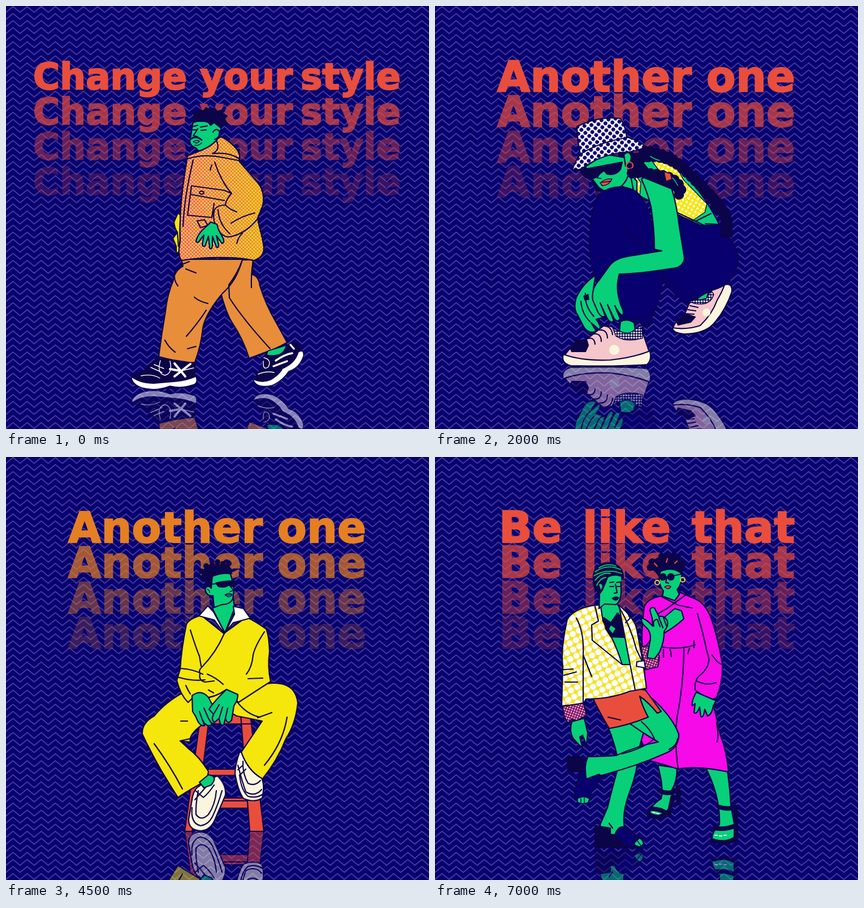
An HTML page that plays this animation: 748 by 748 pixels, repeating every 8000 ms.

```html
<!DOCTYPE html>
<html lang="en">
<head>
<meta charset="utf-8">
<title>Style slides</title>
<style>
html, body { margin: 0; width: 100%; height: 100%; overflow: hidden; background: #08006f; }
svg { display: block; width: 100vw; height: 100vh; }
.slide { opacity: 0; animation: 8s step-end infinite; }
#s1 { animation-name: first; }
#s2 { animation-name: second; }
#s3 { animation-name: third; }
#s4 { animation-name: fourth; }
@keyframes first { 0% { opacity: 1 } 6.25%, 100% { opacity: 0 } }
@keyframes second { 0% { opacity: 0 } 6.25% { opacity: 1 } 37.5%, 100% { opacity: 0 } }
@keyframes third { 0% { opacity: 0 } 37.5% { opacity: 1 } 68.75%, 100% { opacity: 0 } }
@keyframes fourth { 0% { opacity: 0 } 68.75%, 100% { opacity: 1 } }

text { font: 700 75px "DejaVu Sans", sans-serif; letter-spacing: .6px; fill: #e94e3d; stroke: #e94e3d; stroke-width: 2.4; }
.small { font-size: 64px; letter-spacing: .3px; }
.large { font-size: 77px; }
.amber { fill: #e67f22; stroke: #e67f22; }
.fig { fill: none; stroke: #0c0448; stroke-width: 2.2; stroke-linecap: round; stroke-linejoin: round; }
.skin { fill: #07d079; }
.ink { fill: #0c0448; }
.navy { fill: #08006f; }
.white { fill: #fff; }
.cream { fill: #fbf5de; }
.pink { fill: #f5c6ca; }
.red { fill: #e94e3d; }
.orange { fill: #e88e3a; }
.yellow { fill: #f5e60c; }
.magenta { fill: #f60ae8; }
.bare { stroke: none; }
.fine { stroke-width: 1.4; }
.light { stroke: #fff; }
.beads { stroke-dasharray: 0 11; }
.mirror { opacity: .5; }
</style>
</head>
<body>
<svg viewBox="0 0 748 748" preserveAspectRatio="none">
<defs>
  <pattern id="zig" width="24.93" height="12.47" patternUnits="userSpaceOnUse">
    <path d="M-2 13L12.47 .9L27 13" fill="none" stroke="#554dae" stroke-width="1.4"/>
  </pattern>
  <pattern id="halftone" width="4.4" height="4.4" patternUnits="userSpaceOnUse" patternTransform="rotate(45)">
    <circle cx="2.2" cy="2.2" r="1.65" fill="#f5e414"/>
  </pattern>
  <pattern id="hatDots" width="8.8" height="8.8" patternUnits="userSpaceOnUse" patternTransform="rotate(38)">
    <path d="M0 0h9v9h-9z" fill="#fff"/><circle cx="4.4" cy="4.4" r="3.4" fill="#08006f"/>
  </pattern>
  <pattern id="topDots" width="7.4" height="7.4" patternUnits="userSpaceOnUse" patternTransform="rotate(30)">
    <path d="M0 0h8v8h-8z" fill="#f5e60c"/><circle cx="3.7" cy="3.7" r="2.2" fill="#fff"/>
  </pattern>
  <pattern id="sockDots" width="4.6" height="4.6" patternUnits="userSpaceOnUse">
    <path d="M0 0h5v5h-5z" fill="#0c0448"/><circle cx="2.3" cy="2.3" r="1.7" fill="#fff"/>
  </pattern>
  <pattern id="coatDots" width="12.4" height="12.4" patternUnits="userSpaceOnUse" patternTransform="rotate(-28)">
    <path d="M0 0h13v13h-13z" fill="#f3e224"/><circle cx="6.2" cy="6.2" r="5.5" fill="#fff"/>
  </pattern>
  <pattern id="cuffDots" width="4.4" height="4.4" patternUnits="userSpaceOnUse" patternTransform="rotate(20)">
    <path d="M0 0h5v5h-5z" fill="#8c1668"/><circle cx="2.2" cy="2.2" r="1.2" fill="#fff"/>
  </pattern>
  <linearGradient id="warm"><stop offset=".1" stop-color="#f2508c"/><stop offset=".95" stop-color="#e88a3c"/></linearGradient>
  <path id="shell" d="M321 265C335 258 355 255 372 238Q377 229 385 233C398 242 415 255 413 268L412 274C424 288 434 300 445 312C456 325 458 345 452 358L445 375C448 395 455 410 456 428Q456 445 438 450C410 443 350 443 310 450Q303 440 308 415C306 360 312 320 321 265Z"/>
</defs>

<path fill="#08006f" d="M0 0h748v748H0z"/>
<path fill="url(#zig)" d="M0 0h748v748H0z"/>

<!-- Walking man -->
<g class="slide" id="s1">
  <text id="t1" class="small" y="147"><tspan x="48">Change</tspan> <tspan x="343">your</tspan> <tspan x="521">style</tspan></text>
  <use href="#t1" y="62" opacity=".7"/><use href="#t1" y="124" opacity=".42"/><use href="#t1" y="186" opacity=".22"/>
  <g class="fig" id="walker">
    <path class="orange" d="M418 449H437L436 475Q447 478 449 495Q460 530 478 560L497 595Q480 605 465 610L430 623Q420 590 400 560Q390 545 380 508Z"/>
    <path class="orange" d="M310 448L313 460Q298 468 296 485Q285 510 282 540Q275 580 270 620Q285 624 304 628Q322 632 334 630Q345 600 348 570Q352 545 383 508Q408 486 418 448Z"/>
    <path d="M417 452Q408 475 394 493L395 516Q420 555 467 606M437 450Q433 475 434 498M318 465l18 7M333 515Q343 523 357 526M354 538Q340 560 319 584M281 591Q288 604 299 612M321 606L336 602M298 470Q296 485 304 495M308 458L324 452"/>
    <path class="yellow" d="M304 366L297 382Q298 393 303 400L295 411L301 425V438L307 434L309 370ZM303 400L305 425"/>
    <path class="skin" d="M331 204Q329 216 327 228L325 240Q326 248 336 251Q340 258 350 257L372 240L381 215L365 204Z"/>
    <path class="ink" d="M331 206L330 197L335 195L330 188L339 188L341 182L349 186L354 180L361 184L369 181L373 186L384 184L383 191L391 194L386 200L391 207L383 209L379 215L368 206L362 211L358 206Q345 201 331 206Z"/>
    <path class="skin" d="M366 223Q371 215 377 221Q379 232 369 236"/>
    <path d="M331 213l8-2M344 214l12-2M330 219h7M345 220l9-1M339 217Q334 226 331 229l7 2"/>
    <path class="fine" d="M331 240q5-4 11-1q-4 6-11 1zM334 246q6 2 12-4"/>
    <path stroke-width="3" d="M327 235Q336 228 346 237"/>
    <use href="#shell" fill="url(#warm)"/>
    <use href="#shell" fill="url(#halftone)"/>
    <path d="M372 238Q380 254 365 261Q395 258 412 270M322 270Q350 261 384 268L410 273M331 272C320 320 315 350 313 390M369 276C376 298 388 320 399 331Q388 344 388 352Q372 352 368 362Q364 385 380 402Q388 410 397 408Q425 402 446 375M375 360Q376 385 396 403M440 366Q418 371 398 384M388 352Q396 360 408 364M418 402Q411 408 408 420M364 281l-3 9M328 318L386 326L398 331M328 318L326 333L386 344M326 333L321 370L364 374L368 349M338 380L351 378L357 388L344 392Z"/>
    <ellipse cx="346" cy="330" rx="4" ry="2.6"/>
    <path class="skin" d="M362 382C356 390 340 398 336 416Q339 421 343 414L350 405L347 423Q351 428 353 422L358 407L360 428Q364 432 365 424V407L372 426Q376 429 376 422L372 406L382 420Q387 419 384 411L376 396L373 386Z"/>
    <path class="ink" d="M268 623Q255 632 245 645L224 655Q219 662 226 668Q250 678 290 676Q320 676 336 668Q338 660 334 650V632Q300 626 268 623Z"/>
    <path class="white fine" d="M222 656Q240 669 265 667L300 664Q320 662 336 655Q340 668 330 670Q310 677 290 672Q265 682 240 675Q222 668 222 656Z"/>
    <path class="light" stroke-width="4" d="M298 632L317 655M326 633L298 655M290 642L307 645"/>
    <path class="light fine" d="M273 627Q266 650 281 653Q295 650 290 628M256 639L276 648M262 634L279 641M310 645L332 640M239 654Q258 650 272 658"/>
    <path class="ink" d="M460 612Q455 625 452 640L440 658Q437 668 448 670H470Q490 660 500 645Q520 635 526 615Q520 598 510 594L497 600Q480 607 460 612Z"/>
    <path class="skin fine" d="M463 610L496 600Q492 612 484 616Q470 620 461 617Z"/>
    <path class="white fine" d="M437 660Q455 668 470 660Q485 650 489 641Q511 632 517 612Q527 606 526 619Q519 640 500 646Q488 664 470 671Q442 677 437 660Z"/>
    <path class="light" stroke-width="3.4" d="M477 627Q493 616 506 614M473 637L497 628M503 599L509 606"/>
    <path class="light fine" d="M456 622Q470 625 464 638Q454 646 455 628M446 651Q460 645 474 648"/>
  </g>
  <use class="mirror" href="#walker" transform="matrix(1 0 0 -1 0 1358)"/>
</g>

<!-- Crouching woman -->
<g class="slide" id="s2">
  <text id="t2" y="151"><tspan x="110">Another</tspan> <tspan x="480">one</tspan></text>
  <use href="#t2" y="62.3" opacity=".7"/><use href="#t2" y="124.6" opacity=".42"/><use href="#t2" y="187" opacity=".22"/>
  <g class="fig" id="croucher">
    <path class="pink" d="M450 525L440 548Q420 560 421 573L450 578Q480 572 500 545L522 510Q524 495 512 492L488 503Q480 522 462 520Z"/>
    <path class="cream" d="M420 569Q445 573 469 565Q490 545 499 520Q508 505 512 493Q526 489 525 505Q515 535 496 558Q480 580 440 580Q420 578 420 569Z"/>
    <path class="ink" d="M427 557L445 545L460 550L452 559L430 564Z"/>
    <path class="skin" d="M466 502L486 498L480 518Q470 523 462 518Z"/>
    <path class="fine" fill="url(#sockDots)" d="M448 521Q466 521 480 517L488 503L493 510Q488 527 470 527Q458 528 448 521Z"/>
    <path d="M451 530l14 3M447 537l14 2M443 544l15 1"/>
    <circle class="cream bare" cx="480" cy="542" r="7"/>
    <path class="navy" d="M395 365L430 366L500 386Q540 425 536 455Q525 492 498 500Q480 505 463 518L445 524Q415 506 398 478Z"/>
    <path class="skin" d="M340 290L370 262L420 278Q470 320 503 387L470 388L430 370L360 335Z"/>
    <path fill="url(#topDots)" class="fine" d="M374 260L422 276L440 308L481 350L477 365Q466 372 455 380Q440 374 427 367L420 325ZM355 300L364 312L362 337L352 323Z"/>
    <path d="M462 380L488 367M478 385L500 386M430 366Q460 380 476 388"/>
    <g class="ink">
      <path fill="none" stroke-width="14" d="M355 270Q405 255 442 290T500 350T515 400"/>
      <path fill="none" stroke-width="21" class="beads" d="M355 270Q405 255 442 290T500 350T515 400"/>
      <path fill="none" stroke-width="10" d="M370 254Q420 258 455 300T505 365"/>
      <path fill="none" stroke-width="16" class="beads" d="M370 254Q420 258 455 300T505 365"/>
      <path d="M508 380L525 382V409L514 405L506 409Z"/>
      <path d="M324 260L345 255L362 270L380 292L350 302L334 300ZM274 300L285 327L296 328L284 300Z"/>
    </g>
    <path class="skin" d="M266 284Q274 302 289 320Q300 331 318 326L330 318L357 331V310L342 292L335 268L300 262Z"/>
    <path d="M330 318Q340 309 342 296M346 300L351 327"/>
    <path class="ink" d="M257 290L331 276L328 289Q318 301 304 297L299 291L292 296Q285 308 268 304Q260 300 257 290Z"/>
    <path class="red fine" d="M292 313Q302 304 313 306Q308 317 296 318Z"/>
    <path class="fine" d="M290 297l-3 7l7 1M294 312L310 310"/>
    <path class="skin" d="M334 263Q343 254 347 266Q347 279 337 283Z"/>
    <circle cx="344" cy="282" r="6" stroke="#e94e3d"/>
    <path class="navy" d="M288 334Q320 310 354 327Q376 343 384 390L400 440Q408 480 394 525L380 560L325 558Q320 520 285 487Q270 445 274 400Q276 360 288 334Z"/>
    <path d="M330 382Q345 410 372 424M404 478Q430 500 461 516M330 550Q355 557 382 545"/>
    <path class="skin" d="M284 476Q262 490 250 515Q244 535 252 546L264 569Q274 581 285 575L276 560L290 572Q296 569 285 554L300 550L280 500Z"/>
    <path d="M258 522Q260 545 274 558M266 508Q264 530 281 549"/>
    <path class="ink fine" d="M263 513l8-3l1 9l-7 1z"/>
    <path class="skin" d="M365 306Q385 292 412 304Q426 340 432 390L441 445Q440 462 420 464C390 468 360 474 326 474Q318 500 329 530Q336 544 331 547Q326 545 318 530L327 552Q324 561 317 553L305 528L316 556Q312 563 305 553L292 525L301 548Q295 553 288 541L279 520Q276 500 290 485L308 460Q318 446 345 442L401 433L388 430Q388 395 382 355Q376 330 365 306Z"/>
    <path class="ink" fill="none" stroke-width="13" d="M348 296Q385 293 410 301L432 330"/>
    <path stroke-width="18" class="beads" d="M348 296Q385 293 410 301T436 330L428 336"/>
    <path class="bare red" d="M406 294l10 3l2 9l-9 3z"/>
    <path stroke="#07d079" stroke-width="1.6" d="M420 304q6 6 9 13M381 266q10 6 16 7M440 305l7 9"/>
    <path fill="url(#hatDots)" d="M251 213Q290 194 328 199Q337 213 339 232Q362 238 373 249Q352 259 330 259Q290 265 262 286Q252 292 243 289Q250 270 257 262Q252 240 251 213Z"/>
    <path d="M257 262Q292 240 339 233"/>
    <path class="pink" d="M300 564L270 588Q240 598 228 620Q230 634 300 634L370 632Q382 625 380 615L366 574L352 584Q330 586 315 568Z"/>
    <path class="cream" d="M227 616Q260 628 310 626Q350 622 380 610Q384 626 375 634Q330 638 240 636Q222 631 227 616Z"/>
    <path class="ink" d="M239 604L250 592L268 590L271 600L266 611H242Z"/>
    <path class="skin" d="M328 558Q340 552 352 560L355 579Q340 582 326 575Z"/>
    <path class="fine" fill="url(#sockDots)" d="M314 569Q340 585 352 573L366 564L367 587Q340 596 320 584Z"/>
    <path d="M270 588q12-3 13 10M280 580q14-2 14 13M290 573q14-2 15 14M299 566q13 0 15 15M364 570l14-7l-3 7"/>
    <circle class="cream bare" cx="317" cy="608" r="9"/>
  </g>
  <use class="mirror" href="#croucher" transform="matrix(1 0 0 -1 0 1275)"/>
</g>

<!-- Man on a stool -->
<g class="slide" id="s3">
  <text id="t3" class="amber" y="151"><tspan x="110">Another</tspan> <tspan x="480">one</tspan></text>
  <use href="#t3" y="62.3" opacity=".7"/><use href="#t3" y="124.6" opacity=".42"/><use href="#t3" y="187" opacity=".22"/>
  <g class="fig" id="sitter">
    <path class="red" d="M350 552H412V563H350ZM340 603H428V608H340ZM340 608H428V621H340Z"/>
    <path class="red" d="M342 472H358L347 560L329 662H316ZM415 455H432L456 662H431ZM346 455H434V472H344Z"/>
    <path class="yellow" d="M322 412Q285 430 262 458Q240 470 241 490Q255 520 275 555Q290 580 304 602Q330 585 355 572L358 556Q342 530 322 515L308 502L326 504Q322 490 352 470L400 440L390 410Z"/>
    <path class="yellow" d="M375 440L410 418Q440 402 470 400Q512 398 516 435Q512 472 495 498Q480 537 453 570Q425 552 416 522L453 467Q430 462 408 458Z"/>
    <path d="M262 507Q290 545 312 587M309 467h12M308 502L326 498M497 460Q490 505 457 545M445 461L470 452M408 432Q425 455 449 460"/>
    <path class="yellow" d="M345 280Q324 286 319 296Q310 340 308 375L302 395Q308 420 322 434L332 424Q360 432 390 411L411 434Q440 415 468 397Q462 370 466 345Q465 315 460 304Q440 290 425 283L385 312Z"/>
    <path d="M386 312Q372 345 346 372Q340 377 343 383M326 306Q336 338 342 352L345 370M457 309Q440 335 437 350Q435 372 425 384M310 374Q330 375 348 384M303 389Q330 397 352 394M343 383Q340 395 352 398L368 396M356 384q15 6 28 18M428 392L454 391M358 412l9 5M318 404Q322 413 326 419"/>
    <path class="skin" d="M366 246L402 250L404 268L387 311L366 270Z"/>
    <path class="white" d="M357 263L341 281L368 288L386 312L402 293L432 285L420 268L402 264L404 278L387 311L367 274Z"/>
    <path class="skin" d="M362 212Q385 203 397 207L401 222L403 234L401 251Q396 261 382 261L368 266L366 245Q354 247 352 233Q357 225 363 232Z"/>
    <path class="ink" d="M356 226L348 214Q345 198 360 191H390Q400 197 399 206Q384 204 365 210L363 231Z"/>
    <path stroke-width="10" class="beads" d="M348 213L346 202L357 200L352 193L368 191L375 185L386 190L394 188L396 199"/>
    <path class="ink" d="M371 223Q390 218 406 220L408 225L398 230L394 226Q388 232 376 229ZM363 225L372 224"/>
    <path class="fine" d="M387 244q6-5 13-1q-4 8-13 1zM388 244h11M398 230l4 6l-6 2M356 234q4 1 4 6"/>
    <path class="skin" d="M329 422Q345 410 358 425L372 452L368 472Q362 471 357 460L364 473Q355 480 347 464L351 475Q342 477 336 460L330 450Z"/>
    <path class="skin" d="M390 411L410 420Q410 430 403 440L399 465Q392 475 388 462L385 474Q378 476 377 462L369 469Q362 466 367 455L359 446Q368 432 390 411Z"/>
    <path d="M347 464L342 450M357 460L350 444M388 462L392 444M377 462L383 442M367 455L377 438"/>
    <path class="cream" d="M342 582Q334 585 330 600L323 640Q322 660 345 661Q362 660 370 640L388 598Q390 580 374 564Q352 572 342 582Z"/>
    <path class="skin" d="M342 575L358 562Q376 564 363 580L350 585Z"/>
    <path d="M340 590Q335 615 336 632Q345 645 358 632Q370 615 372 590M329 620Q326 648 344 652Q358 650 365 636Q375 615 382 590M335 590l14 12M334 606Q348 590 353 584M349 602Q358 595 368 580"/>
    <path class="cream" d="M413 522Q405 545 405 560Q410 590 420 604Q440 612 453 603Q458 580 452 568Q428 555 416 522Z"/>
    <path d="M410 545Q418 575 424 592Q440 602 452 588M419 538Q418 560 428 577Q440 583 450 572M413 562Q416 590 428 600Q442 604 453 597M419 545l-9 8M424 552l-10 10"/>
  </g>
  <use class="mirror" href="#sitter" transform="matrix(1 0 0 -1 0 1324)"/>
</g>

<!-- Two women -->
<g class="slide" id="s4">
  <text id="t4" class="large" y="151"><tspan x="113">Be</tspan> <tspan x="261">like</tspan> <tspan x="454">that</tspan></text>
  <use href="#t4" y="62.3" opacity=".7"/><use href="#t4" y="124.6" opacity=".42"/><use href="#t4" y="187" opacity=".22"/>
  <g class="fig" id="pair">
    <path class="skin" d="M394 545L428 550Q428 575 418 590L420 612Q404 640 381 633Q376 620 400 604Q405 585 394 545Z"/>
    <path class="skin" d="M478 548L517 554Q522 590 523 615L532 665Q530 682 490 678Q488 665 503 650Q505 600 478 548Z"/>
    <path stroke-width="8" d="M397 590Q412 598 428 590M382 622Q400 622 412 632M430 584L431 612M378 632Q395 642 414 630L420 602M503 619Q518 624 531 619M494 656Q512 660 531 652M490 678Q512 686 532 676V622"/>
    <path class="light" stroke-width="2" d="M385 628l4 1M392 630l4 1M495 669h4M503 670h4M511 669h4"/>
    <path class="magenta" d="M400 246Q376 250 370 265Q366 295 366 325L372 400L360 490L380 537Q410 545 430 552Q460 545 519 557Q516 520 504 490Q498 460 490 430L498 425Q510 395 508 365Q500 320 490 290Q478 255 455 249L435 240Z"/>
    <path class="skin" d="M397 207Q394 194 408 194L436 200Q438 225 428 234L432 243L424 254L402 246L404 237Q394 225 397 207Z"/>
    <path class="skin" d="M424 268L436 272L440 286Q425 300 406 311L400 288Z"/>
    <path d="M399 246L430 262L455 267M446 242L410 268L386 282M464 277Q474 310 481 345Q492 368 466 388Q458 398 460 412Q480 428 498 429M396 335Q430 342 460 332M440 338Q440 400 428 460Q423 500 430 552M404 340v14M416 341l2 12M450 338l-3 10M458 325v12M490 350Q500 365 506 366M462 396Q480 405 497 399M498 470Q502 490 499 504"/>
    <path class="skin" d="M462 416Q453 432 455 440L460 436L458 452Q463 456 468 442L470 459Q475 462 477 446L482 458Q490 455 492 440L497 431Z"/>
    <path class="ink" d="M376 199Q382 180 405 177Q436 176 441 192L436 206Q420 193 399 202L396 210L388 200Z"/>
    <path stroke-width="13" class="beads" d="M381 195L382 186L397 184L401 176L416 177L425 174L433 185L438 190"/>
    <path stroke="#e94e3d" d="M388 188l5 5M411 180l-2 6M428 184l-4 4"/>
    <circle class="ink" cx="403" cy="212" r="5.5"/><circle class="ink" cx="417" cy="212" r="5.5"/>
    <path d="M422 210L435 207M410 212L408 222L413 223"/>
    <path class="red fine" d="M406 230q5-5 11-1q-3 7-11 1z"/>
    <g stroke="#f0c53a"><circle cx="393" cy="222" r="4"/><circle cx="438" cy="217" r="4"/></g>

    <path class="skin" d="M305 475Q320 510 325 545Q315 580 305 620L292 650Q292 668 320 668L360 690Q374 686 365 676L335 655Q330 630 345 590Q360 550 358 525L375 465Z"/>
    <path class="skin" d="M340 468Q370 440 362 423L385 428Q420 460 431 490Q432 515 405 525Q360 545 305 560L268 571Q262 550 270 530Q290 530 320 528Q360 510 395 504Q370 490 340 468Z"/>
    <path d="M365 468Q380 480 388 498Q370 515 330 525M414 517Q428 510 429 498M308 648l6 8"/>
    <path class="red" d="M276 420L335 413L332 366H346L354 410L372 412L400 450L393 453Q378 434 362 423Q366 440 377 460Q340 475 308 480Q290 450 276 420Z"/>
    <path d="M306 460L328 465"/>
    <path fill="url(#coatDots)" d="M283 262Q245 268 234 287Q222 340 226 370L224 440L262 437L267 428Q310 428 345 414L352 413L374 409L368 365L357 306Q354 286 325 262Z"/>
    <path class="skin" d="M290 245L320 255L326 266L336 320L345 367H331Q320 330 297 290Z"/>
    <path class="ink" d="M298 284L311 293L323 276L328 282L334 319L311 318L302 304Z"/>
    <path class="skin fine" d="M311 297l9 6l-6 10l-7-9z"/>
    <path d="M283 264L289 290L277 297L278 324L331 367M326 266Q346 300 356 340L368 365M338 270L345 285L337 293M262 350V437M250 285Q264 310 262 350L277 388M345 367L354 412M226 376l18-1M228 386l22-6M230 398l22 0"/>
    <path fill="url(#cuffDots)" d="M225 441L263 435L268 457L258 462L252 468L242 464L235 470L229 460Z"/>
    <path class="skin" d="M242 468L264 462L270 488L268 510L261 492L256 495L261 515L250 504L244 497Q237 485 242 468Z"/>
    <path fill="url(#cuffDots)" d="M364 337L374 333L397 352L394 371L372 376Z"/>
    <path class="white" d="M357 362L370 360L372 373L356 370Z"/>
    <path class="skin" d="M375 355L380 327Q384 310 372 300Q362 290 366 285Q374 287 385 299L384 285L380 271Q382 264 388 267L396 282Q406 280 411 290Q413 300 405 308Q406 325 397 345L388 357Z"/>
    <path d="M387 299Q384 288 393 287L398 300M396 284L403 302M404 284L409 298M372 335L381 324"/>
    <path class="skin" d="M282 226Q300 210 328 215L329 230Q330 255 320 261L300 260L290 268L291 245Z"/>
    <path class="ink" d="M282 232Q276 205 286 196Q295 186 308 187Q334 190 333 216Q320 211 305 214L296 235L291 242Z"/>
    <path class="skin bare" d="M306 213Q318 207 329 212V222H303Z"/>
    <path stroke="#07d079" stroke-width="1.8" d="M281 210Q305 196 330 206M283 203Q305 188 328 199M290 196Q305 187 320 193M283 218Q295 203 310 206M286 227Q292 214 302 213"/>
    <path class="skin" d="M289 225Q296 220 297 230L293 238Z"/>
    <path d="M309 222l7-1M321 222l7-1M309 229h7M322 229h5M319 225L322 240l-5 1"/>
    <path class="ink fine" d="M313 250q7-5 12-1q-4 8-12 1z"/>

    <path class="ink" d="M233 530H262L264 556L235 557ZM283 652L310 656V690L283 692Z"/>
    <path class="navy" d="M262 531Q268 556 266 570L290 561L298 567Q280 580 275 598L271 611Q252 613 247 600Q247 575 262 555Z"/>
    <path class="skin fine" d="M252 604Q262 598 273 604L271 611Q260 615 252 610Z"/>
    <path class="ink" d="M310 668L345 684L368 692L312 691Z"/>
    <path class="navy" d="M318 668Q325 650 337 655Q352 666 360 675Q350 682 352 690L338 688Z"/>
    <path class="fine" d="M258 604v8M264 603v8M358 679l6 8"/>
  </g>
  <use class="mirror" href="#pair" transform="matrix(1 0 0 -1 0 1390)"/>
</g>
</svg>
</body>
</html>
```
